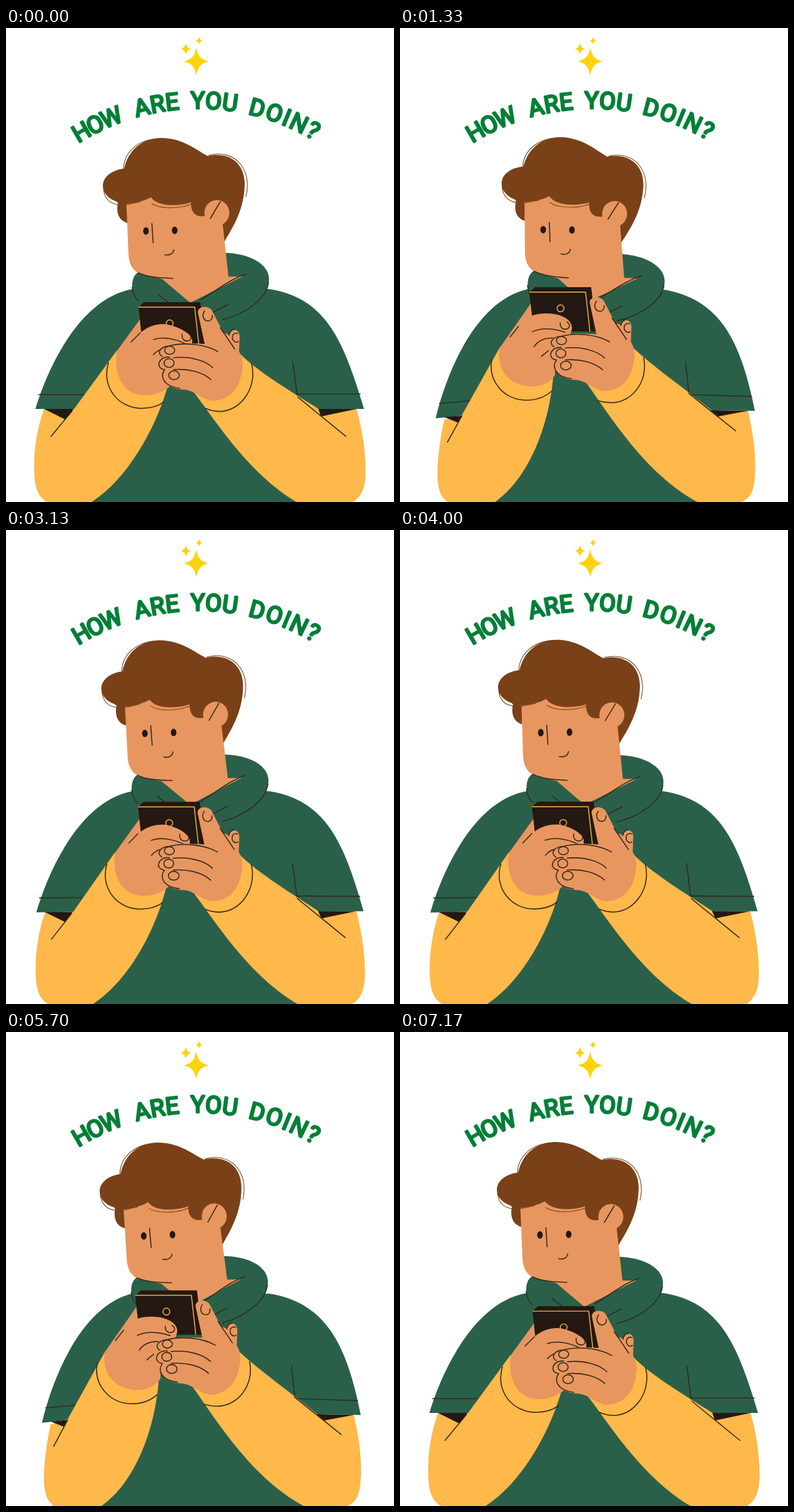
These frames come from a looping animation (621x759 px, 7210 ms). An HTML page:

```html
<!DOCTYPE html>
<html lang="en">
<head>
<meta charset="utf-8">
<title>How are you doin?</title>
<style>
html, body { margin: 0; width: 100%; height: 100%; overflow: hidden; background: #fff; }
svg { display: block; width: 621px; height: 759px; }
.green { fill: #2a6049; }
.yellow { fill: #ffb84a; }
.skin { fill: #e8965f; }
.hair { fill: #7a4118; }
.dark { fill: #231812; }
.line { fill: none; stroke: #33291c; stroke-width: 1.6; stroke-linecap: round; stroke-linejoin: round; }
.wisp { fill: none; stroke: #7a4118; stroke-width: 1.1; }
.gold { fill: none; stroke: #d9a340; stroke-width: 1.7; }
.stars { fill: #ffd20a; }
text {
  font: 38px Roboto, sans-serif; text-anchor: middle; letter-spacing: .5px;
  fill: #007f37; stroke: #007f37; stroke-width: 3; stroke-linejoin: round;
}
.tight { letter-spacing: -2.5px; }
.loose { letter-spacing: 2px; }
</style>
</head>
<body>
<svg viewBox="0 0 621 759">
  <defs>
    <path id="arc" d="M-52 489A360 360 0 0 1 668 489"/>
    <path id="star" d="M0-10C1.300-3.600 3.600-1.300 9 0C3.600 1.300 1.300 3.600 0 10C-1.300 3.600-3.600 1.300-9 0C-3.600-1.300-1.300-3.600 0-10Z"/>
  </defs>

  <g class="stars">
    <use href="#star" transform="translate(304.5 53.5) scale(2.2)"/>
    <use href="#star" transform="translate(288 33.5) scale(.95)"/>
    <use href="#star" transform="translate(309 20.5) scale(.65)"/>
  </g>
  <text class="tight"><textPath href="#arc" startOffset="402">HOW</textPath></text>
  <text><textPath href="#arc" startOffset="500">ARE</textPath></text>
  <text><textPath href="#arc" startOffset="590">YOU</textPath></text>
  <text class="loose"><textPath href="#arc" startOffset="703">DOIN?</textPath></text>

  <!-- torso and sleeves: data-to holds the raised pose -->
  <path class="green" d="M47 610C68 540 120 432 203 418L421 418C512 432 540 500 573 610L505 610L465 759L137 759L109 610Z"
    data-to="M57 625C75 550 122 436 205 418L422 419C512 434 545 500 568 613L498 612L476 759L152 759L99 621Z"/>
  <path class="line" d="M52 587L125 587M459 534L467 596M467 586L567 586"
    data-to="M63 601L112 597M457 534L463 590M463 587L563 590"/>

  <!-- arms -->
  <path class="yellow" d="M61 610C44 655 43 705 47 730C50 745 56 753 65 759L137 759C195 722 240 640 258 576L262 540L177 517L109 610Z"
    data-to="M71 627C62 665 58 710 61 730C63 745 68 753 76 759L152 759C205 722 238 640 245 560L250 530L160 511L99 620Z"/>
  <path class="yellow" d="M373 520C400 548 445 575 502 611L561 610C574 655 577 700 575 722C573 742 566 753 555 759L465 759C385 712 330 620 298 580L320 540Z"
    data-to="M371 510C400 538 443 568 500 613L557 613C568 660 570 695 568 718C567 742 560 753 547 759L476 759C390 712 336 620 296 565L316 530Z"/>
  <path class="dark" d="M61 610L108 610L95 627Z" data-to="M71 623L99 621L93 632Z"/>
  <path class="dark" d="M500 610L561 610L504 622Z" data-to="M497 612L557 613L509 622Z"/>
  <path class="line" d="M72 654L106 613M467 591L544 654" data-to="M76 663L99 621M462 585L537 645"/>
  <path class="line" d="M164 536C152 575 180 609 217 609C234 609 246 604 253 599M393 537C403 575 376 614 342 614C334 614 326 612 319 609"
    data-to="M147 530C140 567 168 596 202 596C220 596 234 589 242 582M390 528C398 565 372 600 338 600C330 600 324 599 317 597"/>

  <g id="head">
    <path class="green" d="M213 390C198 398 198 425 215 445L300 484L347 467C390 455 421 430 421 402C421 378 390 361 350 360L300 380Z"/>
    <path class="hair" d="M180 276C175 295 180 308 194 312V276ZM320 290L350 342L360 290Z"/>
    <path class="skin" d="M192 265L196 362C197 384 208 393 222 396L250 402L295 440L378 398L356 398L347 315L345 265Z"/>
    <path class="hair" d="M192 282C183 284 180 281 177 278C146 268 146 231 189 225C196 196 216 177 249 176C285 177 305 196 323 205C352 198 381 212 382 248C382 285 368 312 350 341L346 300L318 301C305 303 296 298 296 279C284 284 245 289 232 271C222 277 208 280 192 282Z"/>
    <ellipse class="skin" cx="337.500" cy="296" rx="20" ry="20.500"/>
    <path class="wisp" d="M188 225C189 199 211 178 246 177M324 204C365 193 395 225 384 270M156 258C158 275 168 282 181 283M193 283L216 278M233 281C250 292 285 288 298 281"/>
    <path class="line" d="M343 278L327 305M233.500 313L235.500 344M254 363C262 365 268 361 268.500 355M212 392C226 399 245 400 267 401"/>
    <ellipse class="dark" cx="224" cy="325" rx="4.500" ry="6"/>
    <ellipse class="dark" cx="270" cy="324" rx="4.500" ry="6"/>
    <path class="line" d="M384 394C360 401 332 424 312 435M420 408C417 432 387 457 347 467M355 443L326 458M202 415C203 425 206 432 212 437M243 426L259 439"/>
  </g>

  <!-- far hand, phone, near hand -->
  <path class="skin" d="M225 452L177 518C172 560 190 588 222 588C240 588 253 582 262 574L262 480Z"
    data-to="M220 426L159 513C154 550 178 574 210 574C228 574 240 568 248 556L250 460Z"/>
  <g id="phone">
    <path class="dark" d="M212 447L221 439L311 439L319 510L219 510Z"/>
    <path class="gold" d="M212 447H302L309 510"/>
    <circle class="gold" cx="262" cy="473" r="5.500"/>
  </g>
  <path class="skin" d="M214 489C225 479 238 474 252 474C268 475 284 483 292 490C300 496 299 503 296 512L250 545L200 540Z"
    data-to="M210 461C222 456 240 456 252 459C266 463 274 470 275 478C276 485 272 488 271 498L240 525L180 530Z"/>
  <g id="farLines" class="line">
    <path d="M200 503L215 488M236 499C250 494 270 497 288 506M236 523C244 514 256 511 268 513M246 540L258 532"/>
    <path d="M282 490C281 498 285 502 292 501C298 499 297 493 293 490"/>
  </g>
  <g id="nearHand">
    <path class="skin" d="M307 455C308 444 325 444 330 453L348 488L357 491C361 481 373 480 374 494L373 518C379 528 380 538 378 548C374 580 355 597 330 597C312 594 302 580 284 579C262 578 247 568 251 549C240 543 242 531 248 526C240 518 249 508 262 508C280 503 300 505 318 506Z"/>
    <path class="line" d="M262 509C285 503 318 506 339 518M262 509C246 510 241 521 250 526M268 528C295 525 320 533 331 544M262 527C244 525 238 545 254 547M268 547C292 545 315 551 328 563M254 547C246 558 252 574 278 577M343 480L366 514M357 492C358 487 361 483 365 482"/>
    <g class="line">
      <ellipse cx="262" cy="516" rx="8" ry="6.500"/>
      <ellipse cx="261" cy="536.500" rx="8" ry="7"/>
      <ellipse cx="269" cy="556" rx="8.500" ry="7"/>
      <path d="M318 453C312 461 317 470 325 469C329 468 331 464 330 460M371 489C364 487 361 493 363 499C365 503 369 504 372 502"/>
    </g>
  </g>
</svg>
<script>
const LOOP = 3605, LEAD = 45;
const byId = id => document.getElementById(id);
const head = byId('head'), phone = byId('phone'), nearHand = byId('nearHand'), farLines = byId('farLines');
const number = /-?\d+(\.\d+)?/g;

const morphs = [...document.querySelectorAll('[data-to]')].map(el => {
  const from = el.getAttribute('d');
  return { el, from, a: from.match(number).map(Number), b: el.dataset.to.match(number).map(Number) };
});

const wave = u => (1 - Math.cos(Math.PI * u)) / 2;

// Head tilt in degrees: centre, right, left, centre
const tilts = [0, 1.95, -1.85, 0];
function tiltAt(t) {
  const u = t / LOOP * 3, i = Math.floor(u);
  return tilts[i] + (tilts[i + 1] - tilts[i]) * wave(u - i);
}

function draw(now) {
  const t = now % LOOP;
  // The arms swing a little past the raised pose
  const lift = wave((t + LEAD) / LOOP * 2) / 0.867;
  for (const { el, from, a, b } of morphs) {
    let i = 0;
    el.setAttribute('d', from.replace(number, () => {
      const v = a[i] + (b[i] - a[i]) * lift;
      i++;
      return v.toFixed(2);
    }));
  }
  head.setAttribute('transform', `rotate(${tiltAt(t)} 292 485)`);
  phone.setAttribute('transform', `translate(${-5 * lift} ${-24 * lift})`);
  nearHand.setAttribute('transform', `translate(${-3.5 * lift} ${-15.5 * lift})`);
  farLines.setAttribute('transform', `rotate(${-6.7 * lift} 116 700)`);
}

const start = performance.now();
function tick() {
  draw(performance.now() - start);
  requestAnimationFrame(tick);
}
tick();
</script>
</body>
</html>
```
